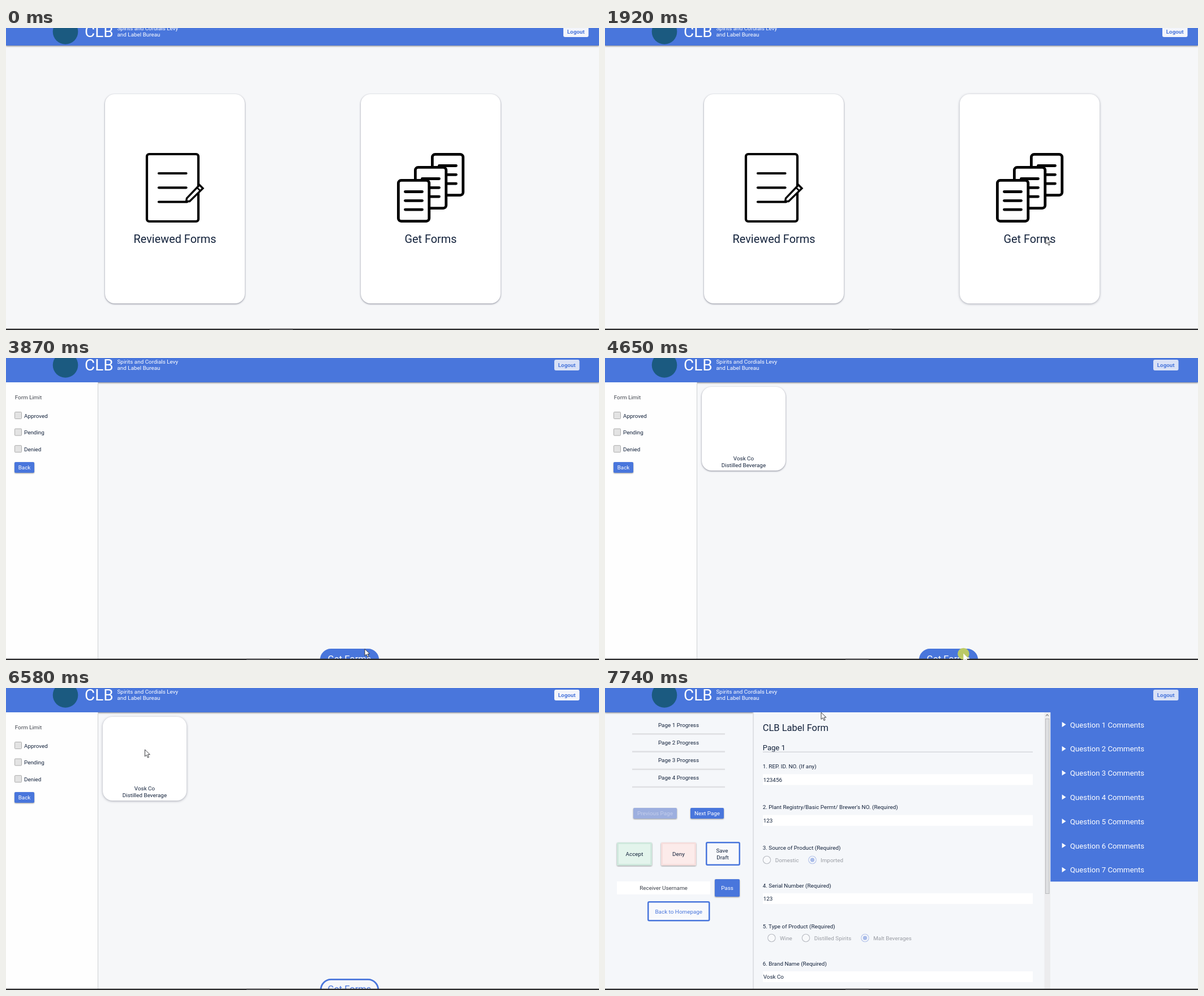
An HTML page for the animation above (8 s loop, 1048 px wide and 534 px high).

```html
<!DOCTYPE html>
<html lang="en">
<head>
<meta charset="utf-8">
<title>Label form review</title>
<style>
html, body { margin: 0; width: 100%; height: 100%; overflow: hidden; background: #f6f7f9; }
svg { display: block; width: 1048px; height: 534px; }
text { font: 9.9px Roboto, Arial, sans-serif; fill: #14233c; white-space: pre; }
.card { fill: #fff; filter: drop-shadow(0 1px 1.6px rgba(20, 24, 50, .5)); }
.card.hover { filter: drop-shadow(0 1px 2.2px rgba(20, 24, 50, .36)); }
.raised { filter: drop-shadow(0 1px 1.2px rgba(0, 0, 0, .4)); }
.bar { filter: drop-shadow(0 1px 1.5px rgba(0, 0, 0, .5)); }
.ink { fill: none; stroke: #000; stroke-linecap: round; stroke-linejoin: round; }
</style>
</head>
<body>
<svg id="stage" viewBox="0 0 1048 534" xmlns="http://www.w3.org/2000/svg"></svg>
<script>
const NS = 'http://www.w3.org/2000/svg';
const BLUE = '#4976dc', PAPER = '#f6f7f9', GREY = '#9a9da4';
const stage = document.getElementById('stage');

function add(parent, tag, attrs = {}) {
  const el = document.createElementNS(NS, tag);
  for (const k in attrs) el.setAttribute(k, attrs[k]);
  parent.appendChild(el);
  return el;
}
const group = (p = stage) => add(p, 'g');
const box = (p, x, y, width, height, fill, more) =>
  add(p, 'rect', { x, y, width, height, fill, ...more });
const line = (p, d, stroke, w, more) =>
  add(p, 'path', { d, stroke, 'stroke-width': w, fill: 'none', ...more });

function text(p, str, x, y, { size = 9.9, fill = '#14233c', mid = false, weight = 400 } = {}) {
  const el = add(p, 'text', { x, y, 'text-anchor': mid ? 'middle' : 'start' });
  el.style.cssText = `font-size:${size}px;fill:${fill};font-weight:${weight}`;
  el.textContent = str;
  return el;
}

function button(p, label, x, y, w, h, fill = BLUE, color = '#fff') {
  box(p, x, y, w, h, fill, { rx: 2, class: 'raised' });
  text(p, label, x + w / 2, y + h / 2 + 3.5, { fill: color, mid: true });
}

function outlined(p, x, y, w, h) {
  box(p, x + 1.25, y + 1.25, w - 2.5, h - 2.5, '#f8f9fc', { rx: 2, stroke: BLUE, 'stroke-width': 2.5 });
}

// Header: seal, name and the logout button
function header(p, bottom, dy, logoutX, logoutY, right = 1048) {
  box(p, 0, -20, right, bottom + 20, BLUE, { class: 'bar' });
  if (right < 1048) box(p, right, 0, 1048 - right, bottom, BLUE);
  add(p, 'circle', { cx: 105, cy: 12.5 + dy, r: 22.3, fill: '#1b5a80' });
  const white = { fill: '#fff' };
  text(p, 'CLB', 139, 21.8 + dy, { size: 28, fill: '#fff' });
  text(p, 'Spirits and Cordials Levy', 196.5, 9.6 + dy, white);
  text(p, 'and Label Bureau', 196.5, 20.8 + dy, white);
  const key = box(p, logoutX, logoutY, 44.5, 19, '#f3f5fb', { rx: 3 });
  text(p, 'Logout', logoutX + 22.2, logoutY + 13.2, { size: 9.8, fill: BLUE, mid: true, weight: 700 });
  return key;
}

function footer(p, tabX) {
  box(p, 0, 531.7, 1048, 2.3, '#2a2a2c');
  box(p, tabX, 531.7, 41, 2.3, '#505053');
}

// Home screen
const home = group();
box(home, 0, 0, 1048, 534, PAPER);
header(home, 31, -6, 985, -3);
const homeCard = x => box(home, x, 117, 247, 370, '#fff', { rx: 17, class: 'card' });
homeCard(175);
const getCard = homeCard(627);

const note = add(home, 'g', { class: 'ink', 'stroke-width': 4.2 });
box(note, 249, 223, 91, 119, '#fff', { rx: 4 });
for (const y of [257, 282.3]) add(note, 'path', { d: `M270 ${y}H318.5` });
add(note, 'path', { d: 'M270 307.5H320' });
add(note, 'path', {
  d: 'M318.5 306.5L319.5 301L342 277.5L348 283.5L324.5 306.5Z',
  fill: '#fff', 'stroke-width': 3.4, 'stroke-linejoin': 'miter'
});
add(note, 'path', { d: 'M337.5 282L343.5 288', 'stroke-width': 2.6 });

const stack = add(home, 'g', { class: 'ink', 'stroke-width': 4.8 });
for (let i = 0; i < 3; i++) {
  const x = 751 - 30 * i, y = 221 + 23 * i;
  box(stack, x + 2.4, y + 2.4, 54.4, 72.2, '#fff', { rx: 5 });
  for (let k = 0; k < 3; k++) add(stack, 'path', { d: `M${x + 14.5} ${y + 22.5 + 15.8 * k}h30` });
}
text(home, 'Reviewed Forms', 298.5, 379.5, { size: 19.9, mid: true });
text(home, 'Get Forms', 750.5, 379.5, { size: 19.9, mid: true });
footer(home, 466);

// List screen
const list = group();
box(list, 0, 0, 1048, 534, PAPER);
const listLogout = header(list, 43, 0, 969, 3);
box(list, 0, 43, 162, 489, '#fefefe');
box(list, 162, 43, 1, 489, '#cfd0d3');
text(list, 'Form Limit', 15.7, 72.8, { fill: '#41454d' });
['Approved', 'Pending', 'Denied'].forEach((s, i) => {
  const y = 95.5 + 29.6 * i;
  box(list, 15.5, y, 12, 12, '#e3e3e3', { stroke: '#adadad', rx: 1 });
  text(list, s, 32, y + 10.1);
});
button(list, 'Back', 15, 184, 35, 19);

const item = group(list);
const itemCard = box(item, 171, 51, 148, 148, '#fff', { rx: 17, class: 'card' });
text(item, 'Vosk Co', 245, 180.6, { mid: true });
text(item, 'Distilled Beverage', 245, 193, { mid: true });

const getKey = box(list, 556.4, 515.4, 101.4, 36, PAPER, { rx: 18, stroke: BLUE, 'stroke-width': 2.8 });
const getLabel = text(list, 'Get Forms', 607, 538, { size: 16.6, mid: true });
footer(list, 425);

// Form screen
const form = group();
box(form, 0, 0, 1048, 534, '#f5f7fa');
header(form, 43, 0, 969, 3, 262).setAttribute('fill', '#d9e1f6');
box(form, 262, 43, 525, 489, '#f5f7fa');
box(form, 261.5, 43, 1, 489, '#c9cbd0');

for (let i = 0; i < 4; i++) {
  const y = 68.6 + 31.25 * i;
  text(form, `Page ${i + 1} Progress`, 130, y, { mid: true });
  box(form, 48, y + 11.4, 164, 2.6, '#dfe0e3');
}
button(form, 'Previous Page', 50, 212, 77, 19, '#9dafdf', '#c3cdec');
button(form, 'Next Page', 151, 212, 59, 19);

function tinted(label, x, fill, edge) {
  box(form, x, 273, 62, 41, fill, { rx: 2, class: 'raised' });
  box(form, x + 1.5, 274.5, 59, 38, 'none', { rx: 1, stroke: edge, 'stroke-width': 3 });
  text(form, label, x + 31, 297.3, { mid: true });
}
tinted('Accept', 21, '#e3f4ec', '#cfe8dd');
tinted('Deny', 99, '#fcebea', '#f6dedd');
outlined(form, 178, 272, 61, 42);
text(form, 'Save', 207, 290.6, { mid: true });
text(form, 'Draft', 208, 303.3, { mid: true });
box(form, 21, 342, 165, 23, '#fff');
text(form, 'Receiver Username', 103.5, 357, { fill: '#3c4049', mid: true });
button(form, 'Pass', 194, 338, 44, 31);
outlined(form, 75, 377, 110.5, 35.5);
text(form, 'Back to Homepage', 130.3, 399.2, { fill: BLUE, mid: true });

text(form, 'CLB Label Form', 278.7, 76, { size: 16.5 });
text(form, 'Page 1', 278.7, 109.6, { size: 13.1 });
box(form, 279, 112.6, 477, 1, '#c6c8cd');

[
  ['1. REP. ID. NO. (If any)', 142, '123456'],
  ["2. Plant Registry/Basic Permt/ Brewer's NO. (Required)", 214.3, '123'],
  ['3. Source of Product (Required)', 286.4],
  ['4. Serial Number (Required)', 352.5, '123'],
  ['5. Type of Product (Required)', 424.8],
  ['6. Brand Name (Required)', 490.6, 'Vosk Co']
].forEach(([label, y, value]) => {
  text(form, label, 278.7, y);
  if (!value) return;
  box(form, 279, y + 10.4, 477, 19, '#fff');
  text(form, value, 279.7, y + 23.5);
});

function radio(label, cx, cy, tx, on) {
  add(form, 'circle', { cx, cy, r: 6.7, fill: '#f8f9fb', stroke: on ? '#b4c3ea' : '#b9bcc3', 'stroke-width': 1.1 });
  if (on) add(form, 'circle', { cx, cy, r: 3.7, fill: '#a9bce9' });
  text(form, label, tx, cy + 3.5, { fill: GREY });
}
radio('Domestic', 286, 304, 300.7);
radio('Imported', 366.5, 304, 381, true);
radio('Wine', 294.4, 442, 309);
radio('Distilled Spirits', 355, 442, 369.7);
radio('Malt Beverages', 459.5, 442, 474.2, true);

box(form, 776.5, 43, 10.5, 489, '#ececee');
line(form, 'M779 49.5L781.5 46.8L784 49.5', '#777', 1.1);
box(form, 778.5, 54.5, 6.5, 309, '#dedfe1', { stroke: '#b9babd' });

box(form, 787.3, 42, 260.7, 300.3, BLUE);
for (let i = 0; i < 7; i++) {
  const y = 64.6 + 42.78 * i;
  add(form, 'path', { d: `M807.6 ${y - 4.6}l7 4.6l-7 4.6z`, fill: '#fff' });
  text(form, `Question ${i + 1} Comments`, 822, y + 5, { size: 13.2, fill: '#fff' });
}
footer(form, 425);

// Pointer
const click = add(stage, 'circle', { cx: 633.5, cy: 523, r: 10.3, fill: '#c3d05c', opacity: .93 });
const pointer = add(stage, 'path', {
  d: 'M0 0V12L2.9 9.4L5 14.2L7 13.3L5 8.7H8.9Z',
  fill: '#fff', stroke: '#26282c', 'stroke-width': .9, 'stroke-linejoin': 'round'
});

const LOOP = 8000;
const PATH = [
  [0, -40, -40], [740, 924.5, 505.5], [1140, 844.5, 427.5], [1520, 845, 428],
  [1920, 779, 370], [3090, 718.5, 415.5], [3470, 654.5, 480.5], [3870, 634, 514.5],
  [4250, 633.7, 523], [5050, 632, 517], [5440, 449.5, 290.5], [5810, 332.5, 208.5],
  [6200, 250, 115], [6580, 245.5, 109], [7740, 382, 43.3]
];

const show = (el, on) => el.setAttribute('visibility', on ? 'visible' : 'hidden');

function draw(t) {
  const within = (a, b) => t >= a && t < b;
  const [, x, y] = PATH.filter(s => s[0] <= t).pop();
  home.style.display = t < 2720 ? '' : 'none';
  list.style.display = within(2720, 7380) ? '' : 'none';
  form.style.display = t >= 7380 ? '' : 'none';

  getCard.classList.toggle('hover', t >= 1140);
  itemCard.classList.toggle('hover', t >= 6200);
  item.style.display = t >= 4650 ? '' : 'none';
  listLogout.setAttribute('fill', t < 5050 ? '#d9e1f6' : '#f3f5fb');

  const hot = within(3870, 5440);
  getKey.setAttribute('fill', hot ? BLUE : PAPER);
  getLabel.style.fill = hot ? '#fff' : BLUE;

  const pressed = within(4650, 5050);
  show(click, pressed);
  pointer.setAttribute('stroke', pressed ? '#eef0d8' : '#26282c');
  pointer.setAttribute('transform', `translate(${x} ${y})`);
}

const start = performance.now();
function tick() {
  draw((performance.now() - start) % LOOP);
  requestAnimationFrame(tick);
}
tick();
</script>
</body>
</html>
```
